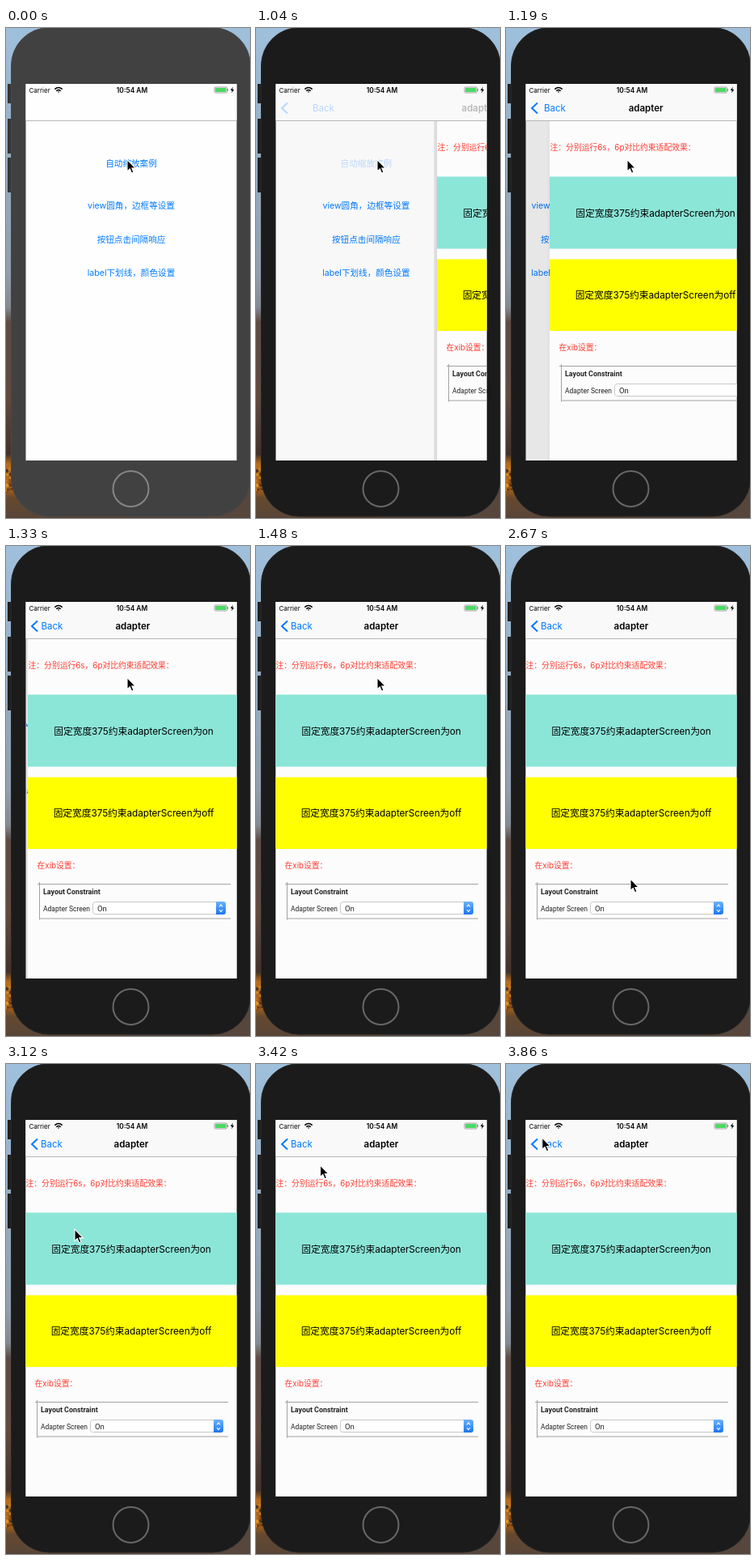
Recreate the animation shown at these times as an HTML page. Size 302 by 605 pixels, loop 8 s.

```html
<!DOCTYPE html>
<html lang="zh-CN">
<head>
<meta charset="utf-8">
<style>
  html, body { margin: 0; width: 100%; height: 100%; overflow: hidden; }
  svg { display: block; width: 302px; height: 605px; }
  text { font-family: Inter, "Noto Sans CJK SC", "Noto Sans CJK", sans-serif; white-space: pre; }
  .mid { text-anchor: middle; }
  .link { font-size: 10.6px; fill: #007aff; }
  .note { font-size: 9.8px; fill: #ff3b30; }
  .big { font-size: 11.8px; letter-spacing: -.08px; }
  .xib { font-family: Roboto, sans-serif; fill: #222; }
</style>
</head>
<body>
<svg viewBox="0 0 302 605">
  <defs>
    <linearGradient id="wallpaper" x2="0" y2="1">
      <stop offset="0" stop-color="#9fc0dc"/>
      <stop offset=".3" stop-color="#95abc0"/>
      <stop offset=".5" stop-color="#929eac"/>
      <stop offset=".57" stop-color="#848991"/>
      <stop offset=".6" stop-color="#5d4c45"/>
      <stop offset=".75" stop-color="#604a40"/>
      <stop offset=".87" stop-color="#44322a"/>
      <stop offset=".89" stop-color="#b86d1a"/>
      <stop offset=".94" stop-color="#a8621a"/>
      <stop offset=".96" stop-color="#65492f"/>
      <stop offset="1" stop-color="#584538"/>
    </linearGradient>
    <linearGradient id="edge">
      <stop offset="0" stop-color="#000" stop-opacity=".08"/>
      <stop offset="1" stop-color="#000" stop-opacity=".2"/>
    </linearGradient>
    <linearGradient id="stepper" x2="0" y2="1">
      <stop offset="0" stop-color="#6cb2f9"/>
      <stop offset="1" stop-color="#1b75f0"/>
    </linearGradient>
    <clipPath id="screen"><rect x="24.5" y="69" width="261" height="465"/></clipPath>
  </defs>

  <rect width="302" height="605" fill="url(#wallpaper)"/>
  <rect x="150" y="535" width="152" height="70" fill="#56463c"/>
  <g id="leaves"></g>

  <path id="sideButtons" d="M2 69h6v24h-6zM2 112h6v43h-6zM2 160h6v43h-6z"/>
  <rect id="body" x="6.5" y="-.5" width="296" height="603.5" rx="47"/>
  <circle id="home" cx="154.5" cy="569" r="22" fill="none" stroke-width="2"/>

  <g clip-path="url(#screen)">
    <g id="menu">
      <rect x="24" y="69" width="340" height="465" fill="#fefefe"/>
      <text id="pressed" class="link mid" x="155" y="171">自动缩放案例</text>
      <text class="link mid" x="155" y="223">view圆角，边框等设置</text>
      <text class="link mid" x="155" y="265">按钮点击间隔响应</text>
      <text class="link mid" x="155" y="305.5">label下划线，颜色设置</text>
    </g>
    <rect id="dim" x="24" y="69" width="262" height="465"/>

    <g id="detail">
      <rect id="shadow" x="20" y="114" width="4.5" height="420" fill="url(#edge)"/>
      <rect x="24" y="69" width="262" height="465" fill="#fcfcfc"/>
      <text class="note" x="24.5" y="150.5">注：分别运行6s，6p对比约束适配效果：</text>
      <rect x="24" y="183.5" width="262" height="89" fill="#8be6d8"/>
      <text class="big mid" x="155" y="232.5">固定宽度375约束adapterScreen为on</text>
      <rect x="24" y="285.5" width="262" height="88.5" fill="#ff0"/>
      <text class="big mid" x="155" y="333.5">固定宽度375约束adapterScreen为off</text>
      <text class="note" x="35.5" y="398">在xib设置：</text>
      <path d="M36 417.5H275M38 460H275M38.5 415V461.5" stroke="#a2a2a2" fill="none"/>
      <text class="xib" x="43" y="430" font-size="8.9" font-weight="700">Layout Constraint</text>
      <text class="xib" x="43" y="450.5" font-size="8.5">Adapter Screen</text>
      <rect x="104.5" y="439.5" width="164" height="15" rx="3" fill="#fff" stroke="#c9c9c9"/>
      <path d="M257 439H266a3 3 0 0 1 3 3V452a3 3 0 0 1-3 3H257z" fill="url(#stepper)"/>
      <path d="M261 445.5l2-2.5 2 2.5M261 449l2 2.5 2-2.5" fill="none" stroke="#fff" stroke-width="1.2"/>
      <text class="xib" x="110" y="451" font-size="9.6">On</text>
    </g>

    <rect id="bar" x="24" y="69" width="262" height="45"/>
    <path d="M24 114.5H286" stroke="#b8b8b8"/>
    <g id="nav">
      <path d="M39 92.5l-7 6.5 7 6.5" fill="none" stroke="#007aff" stroke-width="2"/>
      <text id="back" x="43" y="103" font-size="11.5" fill="#007aff">Back</text>
      <text id="title" class="mid" x="155" y="103" font-size="11.5" font-weight="600">adapter</text>
    </g>

    <text x="28.5" y="79.5" font-size="8">Carrier</text>
    <g fill="none" stroke="#000" stroke-width="1.5">
      <path d="M60.3 75.6q4.7-4.2 9.4 0M62.3 77.7q2.7-2.4 5.4 0"/>
      <path d="M63.7 78.5h2.6l-1.3 1.5z" fill="#000" stroke="none"/>
    </g>
    <text class="mid" x="156" y="79.7" font-size="8.4" font-weight="600">10:54 AM</text>
    <rect x="258" y="73" width="15.5" height="7" rx="1.5" fill="#fff" stroke="#888" stroke-width=".8"/>
    <rect x="259" y="74" width="13.5" height="5" rx=".7" fill="#4cd964"/>
    <path d="M274.6 75.2v2.6" stroke="#888"/>
    <path d="M280.8 72.8l-3 4.2h2l-.7 3.2 3.2-4.3h-2z"/>
  </g>

  <path id="cursor" d="M0 0V14.5L3.3 11.5 5.5 16.8 8 15.7 5.8 10.6H10.3Z" stroke="#fff" stroke-width="1.1"/>
</svg>
<script>
const LOOP = 8000, PUSH_START = 1040, WIDTH = 262;
const $ = id => document.getElementById(id);
const set = (id, attrs) => {
  for (const name in attrs) $(id).setAttribute(name, attrs[name]);
};
const shift = (id, x, y = 0) => set(id, { transform: `translate(${x} ${y})` });

// [start time, values...]; each pose holds until the next
const pushSteps = [[0, WIDTH], [1040, 200], [1190, 30], [1330, 3], [1480, 0]];
const cursorSteps = [
  [0, 150, 162.5], [2080, 185, 198.5], [2230, 235, 331], [2370, 167, 398],
  [2520, 156, 403], [2670, 154, 411], [2820, 147.5, 430], [2970, 139, 431],
  [3120, 85, 204], [3270, 82, 138], [3420, 79.5, 125], [3570, 53.5, 90],
  [3720, 46.5, 90], [3860, 44.8, 91]
];
const poseAt = (steps, time) => steps.findLast(step => step[0] <= time).slice(1);

function scatterLeaves() {
  let seed = 7;
  const random = () => (seed = seed * 16807 % 2147483647) / 2147483647;
  const colors = ['#e0901c', '#8a4c16', '#4e331c', '#c9781c'];
  let shapes = '';
  for (let i = 0; i < 50; i++) {
    const x = random() * 20, y = 537 + random() * 36;
    shapes += `<circle cx="${x}" cy="${y}" r="${1 + random() * 2}" fill="${colors[i % 4]}"/>`;
  }
  $('leaves').innerHTML = shapes;
}

function draw(time) {
  const pushed = time >= PUSH_START;
  const [offset] = poseAt(pushSteps, time);
  const progress = 1 - offset / WIDTH;

  set('body', { fill: pushed ? '#1b1b1b' : '#414141', stroke: pushed ? '#262626' : '#484848' });
  set('sideButtons', { fill: pushed ? '#202020' : '#343638' });
  set('home', { stroke: pushed ? '#676767' : '#858585' });
  set('bar', { fill: pushed ? '#f9f9f9' : '#fefefe' });

  shift('menu', -0.3 * WIDTH * progress);
  set('pressed', { opacity: pushed ? 0.25 : 1 });
  set('dim', { opacity: 0.1 * progress });
  shift('detail', offset);
  set('shadow', { opacity: pushed ? 1 - progress : 0 });

  set('nav', { opacity: Math.min(1, progress * 1.1) });
  shift('back', 0.135 * offset);
  shift('title', 0.605 * offset);

  shift('cursor', ...poseAt(cursorSteps, time));
}

function tick() {
  draw(performance.now() % LOOP);
  requestAnimationFrame(tick);
}

scatterLeaves();
tick();
</script>
</body>
</html>
```
